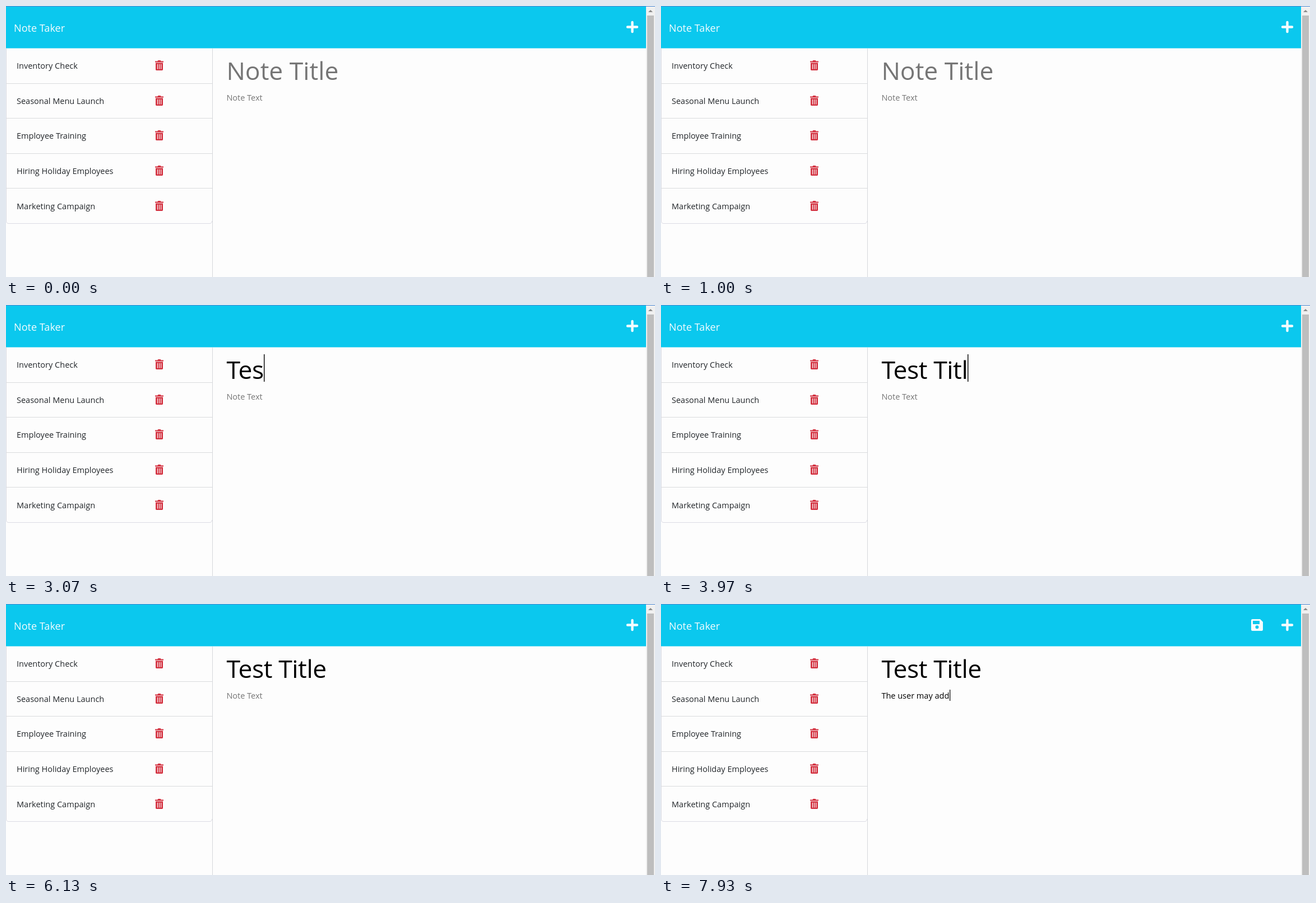
An HTML page for the animation above (8 s loop, 1158 by 484 pixels).

```html
<!DOCTYPE html>
<html lang="en">
<head>
<meta charset="utf-8">
<title>Note Taker</title>
<style>
  html, body { margin: 0; width: 100%; height: 100%; overflow: hidden; background: #fdfdfd; }
  svg { display: block; width: 1158px; height: 484px; }
  text { font: 14.5px "Open Sans", "Noto Sans", sans-serif; white-space: pre; fill: #000; }
  #list text { fill: #212529; }
  #brand { font-size: 18.1px; fill: #f4fcfe; }
  #title { font-size: 44.4px; letter-spacing: -.4px; }
  #title.empty { letter-spacing: 0; }
  .empty { fill: #757575; }
</style>
</head>
<body>
<svg viewBox="0 0 1158 484">
  <defs>
    <g id="trash">
      <path fill="#d3303f" fill-rule="evenodd" d="M0 1.4H4.4L5.3 0H9.7L10.6 1.4H15V3.4H0ZM1 4.6H14V16.6Q14 18 12.6 18H2.4Q1 18 1 16.6ZM3.8 6.8V15.8H5V6.8ZM6.9 6.8V15.8H8.1V6.8ZM10 6.8V15.8H11.2V6.8Z"/>
    </g>
  </defs>
  <rect width="1158" height="484" fill="#fdfdfd"/>
  <rect width="1142" height="75.5" fill="#0bc8ee"/>
  <rect width="1158" height="1" fill="#4a86d2"/>

  <text id="brand" x="14" y="46">Note Taker</text>
  <path id="save" fill="#f4fcfe" fill-rule="evenodd" d="M1055.3 27H1069L1074 32V45.7Q1074 48 1071.7 48H1055.3Q1053 48 1053 45.7V29.3Q1053 27 1055.3 27ZM1056 30V36H1068V30ZM1063.5 38.2A3 3 0 1 0 1063.5 44.2A3 3 0 1 0 1063.5 38.2Z"/>
  <path d="M1109 37.5H1126M1117.5 29V46" stroke="#f4fcfe" stroke-width="4.4" stroke-linecap="round"/>

  <g id="list"></g>
  <path d="M.5 76V384Q.5 388.5 5 388.5H363Q367.5 388.5 367.5 384" fill="none" stroke="#dcdce4"/>
  <rect x="368" y="76" width="1" height="408" fill="#d6d8dc"/>

  <text id="title" x="393.4" y="132"></text>
  <text id="body" x="393.4" y="169"></text>
  <rect id="caret" fill="#000"/>

  <rect x="1142" y="1" width="16" height="483" fill="#f0f0f0"/>
  <rect x="1144" y="17" width="12" height="467" fill="#bebebe"/>
  <path d="M1146 11L1150 7L1154 11Z" fill="#8a8a8a"/>
</svg>
<script>
const LOOP = 8000, BLINK = 500, SAVE_AT = 6420;
const $ = id => document.getElementById(id);

const notes = ["Inventory Check", "Seasonal Menu Launch", "Employee Training",
  "Hiring Holiday Employees", "Marketing Campaign"];
$("list").innerHTML = notes.map((name, i) => {
  const y = 62.7 * i;
  const line = i < 4 ? `<rect y="${Math.round(137.6 + 62.6 * i)}" width="368" height="1" fill="#dadbdd"/>` : "";
  return `<text x="19" y="${112 + y}">${name}</text>
    <use href="#trash" x="266" y="${Math.round(97 + y)}"/>${line}`;
}).join("");

// Each field: key press times, focus span, caret box
const fields = [
  { el: $("title"), hint: "Note Title", value: "Test Title", focus: 2480, blur: 5620, top: 88, size: 49, wide: 1.4,
    keys: [2820, 2930, 3040, 3170, 3290, 3440, 3590, 3740, 3880, 4030] },
  { el: $("body"), hint: "Note Text", value: "The user may add", focus: 5620, blur: LOOP, top: 153, size: 20, wide: 1.2,
    keys: [6330, 6430, 6540, 6640, 6750, 6850, 6960, 7070, 7170, 7270, 7380, 7480, 7590, 7690, 7800, 7900] }
];

function setText(el, text, empty) {
  if (el.textContent !== text) el.textContent = text;
  el.setAttribute("class", empty ? "empty" : "");
}

function draw(t) {
  let shown = false;
  for (const f of fields) {
    const n = f.keys.filter(k => k <= t).length;
    setText(f.el, n ? f.value.slice(0, n) : f.hint, !n);
    if (t < f.focus || t >= f.blur) continue;
    const since = t - (n ? f.keys[n - 1] : f.focus);
    shown = Math.floor(since / BLINK) % 2 === 0;
    const x = 393.6 + (n ? f.el.getComputedTextLength() : 0);
    const box = { x: Math.round(x), y: f.top, width: f.wide, height: f.size };
    for (const key in box) $("caret").setAttribute(key, box[key]);
  }
  $("caret").style.display = shown ? "" : "none";
  $("save").style.display = t >= SAVE_AT ? "" : "none";
}

const start = performance.now();
function tick() {
  draw((performance.now() - start) % LOOP);
  requestAnimationFrame(tick);
}
tick();
</script>
</body>
</html>
```
